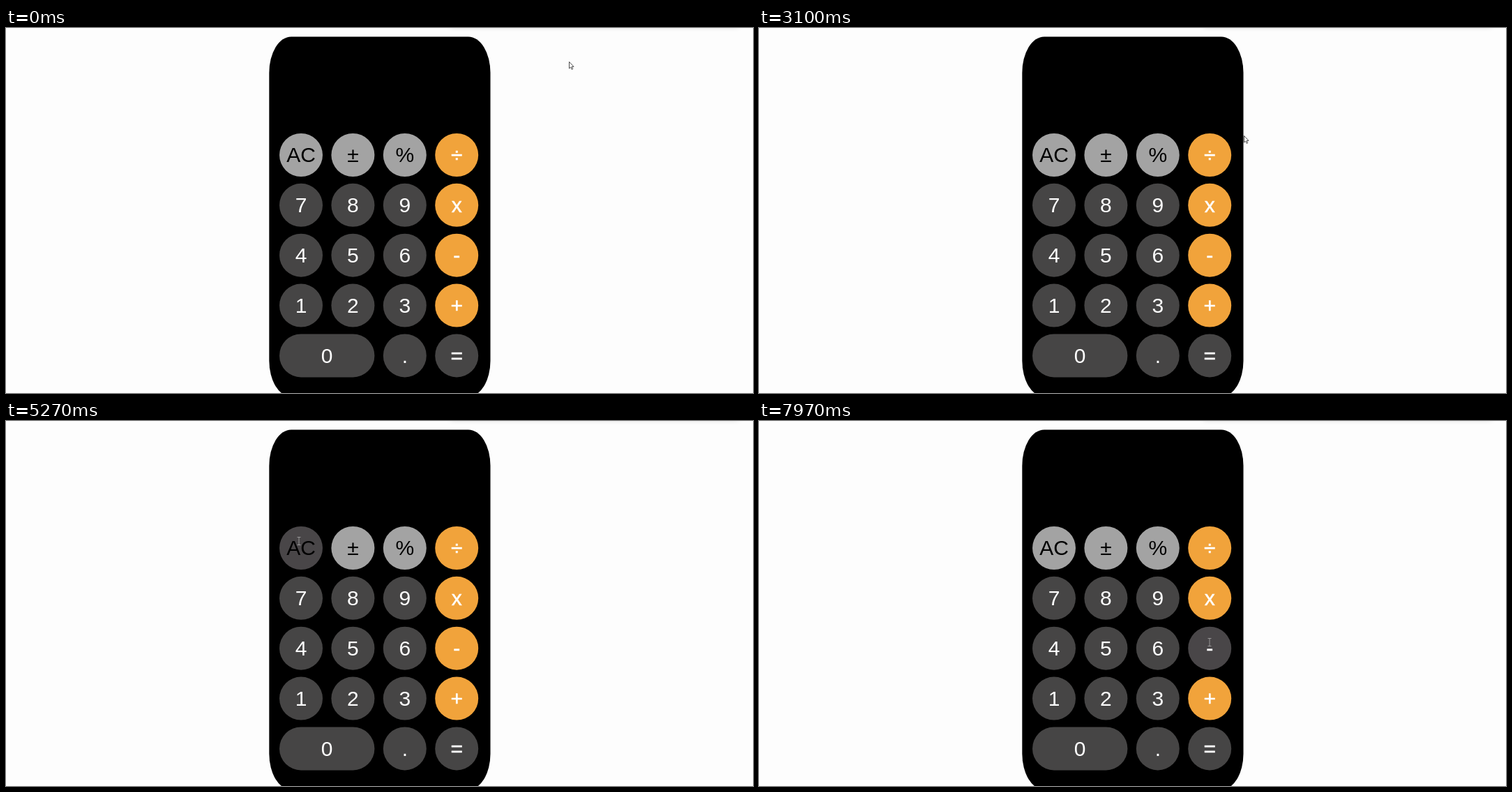
An HTML page that plays this animation: 1071x523 px, repeating every 8 s.

```html
<!DOCTYPE html>
<html lang="en">
<head>
<meta charset="utf-8">
<title>Calculator</title>
<style>
html, body { margin: 0; width: 100%; height: 100%; overflow: hidden; background: #fdfdfd; }
#shade { position: absolute; left: 638px; top: -30px; width: 412px; height: 28px; box-shadow: 0 0 9px rgba(0, 0, 0, .17); }
svg { position: absolute; inset: 0; width: 100%; height: 100%; font: 30px "Liberation Sans", Arial, sans-serif; }
.key { fill: #464545; }
.gray { fill: #a3a3a3; }
.orange { fill: #f1a33b; }
.gray.hover, .orange.hover { fill: #494648; }
text { fill: #fff; text-anchor: middle; cursor: default; }
.gray + text { fill: #000; }
.sign + text { stroke: #fff; stroke-width: .5px; }
#arrow { fill: #fff; stroke: #222; stroke-width: .8px; }
#beam { fill: none; stroke: #aaa; stroke-width: .8px; }
</style>
</head>
<body>
<div id="shade"></div>
<svg>
  <g id="panel"><rect x="377.3" y="12.4" width="317.2" height="516" rx="31.7" ry="51.6"/></g>
  <path id="arrow" d="M.5 .5V10L2.7 8L4.2 11.4L5.7 10.7L4.2 7.4H7Z"/>
  <path id="beam" d="M-2.5 -5.5H2.5M0 -5.5V5.5M-2.5 5.5H2.5"/>
</svg>
<script>
const LOOP = 8000, SIZE = 62, PITCH_X = 74.4, PITCH_Y = 71.85;
const [panel, arrow, beam] = ["panel", "arrow", "beam"].map(id => document.getElementById(id));

function add(tag, attrs) {
  const el = document.createElementNS("http://www.w3.org/2000/svg", tag);
  for (const name in attrs) el.setAttribute(name, attrs[name]);
  return panel.appendChild(el);
}

function addKey(label, row, col) {
  const w = label === "0" ? SIZE + PITCH_X : SIZE;
  const x = 392 + col * PITCH_X, y = 151 + row * PITCH_Y;
  const cx = x + w / 2, cy = y + SIZE / 2;
  const color = "÷x-+".includes(label) ? "orange" : row ? "" : "gray";
  const sign = "÷x-+=".includes(label) ? "sign" : "";
  const el = add("rect", { class: `key ${color} ${sign}`, x, y, width: w, height: SIZE, rx: SIZE / 2 });
  const text = add("text", { x: cx, y: cy + 10.4 });
  text.textContent = label;
  return { el, cx, cy, w, textW: text.getComputedTextLength() };
}

// A blank cell lies under the wide zero key
const keys = ["AC ± % ÷", "7 8 9 x", "4 5 6 -", "1 2 3 +", "0  . ="].flatMap((labels, row) =>
  labels.split(" ").map((label, col) => label && addKey(label, row, col)).filter(Boolean));

// Pointer stops: time, x, y
const stops = [
  [0, 807, 48], [870, 194, 270], [1340, 515, 257], [2100, 361, 218], [2600, 612, 168],
  [3670, 795, 137], [5270, 420, 172], [5640, 420, 172], [6440, 577, 178],
  [6900, 646, 180], [7970, 646, 317], [LOOP, 646, 317]
];

const ease = u => (u = Math.min(1, Math.max(0, u)), u * u * (3 - 2 * u));

function pointerAt(t) {
  const n = stops.findIndex(s => s[0] > t);
  const [t0, x0, y0] = stops[n - 1], [t1, x1, y1] = stops[n];
  const u = ease((t - t0) / (t1 - t0));
  return [x0 + (x1 - x0) * u, y0 + (y1 - y0) * u].map(Math.round);
}

function draw() {
  const t = performance.now() % LOOP;
  const [x, y] = pointerAt(t);
  const scroll = Math.round(16 * (ease((t - 3350) / 200) - ease((t - 3900) / 200)));
  panel.setAttribute("transform", `translate(0 ${-scroll})`);

  let onText = false;
  for (const { el, cx, cy, w, textW } of keys) {
    const dx = Math.abs(x - cx), dy = Math.abs(y + scroll - cy);
    const over = Math.hypot(Math.max(0, dx - (w - SIZE) / 2), dy) < SIZE / 2;
    el.classList.toggle("hover", over);
    onText ||= over && dx <= textW / 2 && dy < 17;
  }
  arrow.style.display = onText ? "none" : "";
  beam.style.display = onText ? "" : "none";
  (onText ? beam : arrow).setAttribute("transform", `translate(${x} ${y})`);
  requestAnimationFrame(draw);
}
draw();
</script>
</body>
</html>
```
